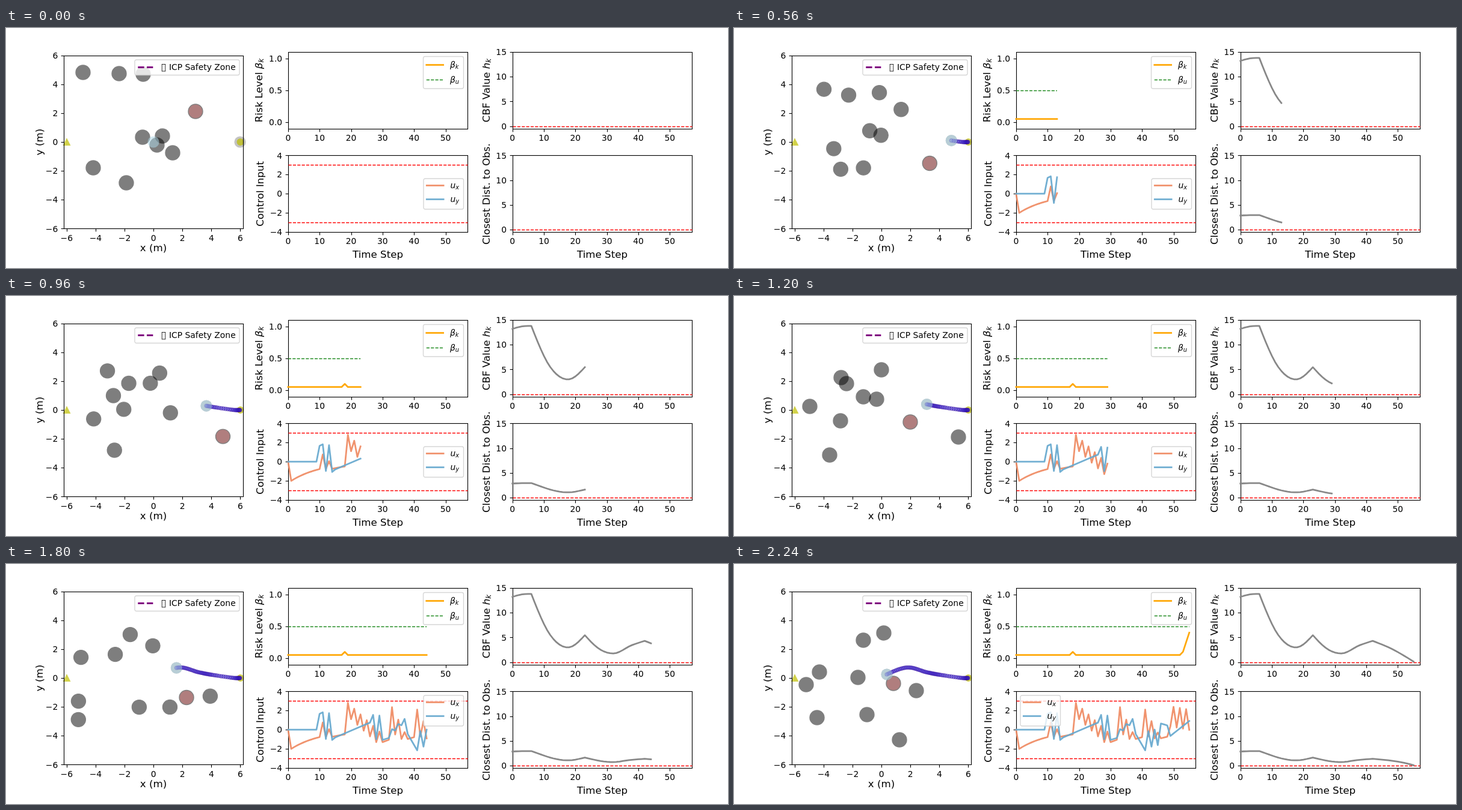
An HTML page for the animation above (2.28 s loop, 1200x400 px).

```html
<!DOCTYPE html>
<html lang="en">
<head>
<meta charset="utf-8">
<title>Safe navigation plots</title>
<style>
  html, body { margin: 0; width: 100%; height: 100%; overflow: hidden; background: #fff; }
  svg { display: block; width: 100vw; height: 100vh; }
  text { font-family: "DejaVu Sans", sans-serif; font-size: 13.89px; fill: #000; }
  .label { font-size: 16.67px; text-anchor: middle; }
  .math { font-style: italic; }
  .frame { fill: none; stroke: #000; stroke-width: 1.11; }
  .curve { fill: none; stroke-width: 2.78; stroke-linejoin: round; stroke-linecap: square; }
  .dashes { stroke: #800080; stroke-dasharray: 10.3 4.44; stroke-linecap: butt; }
  .thin { fill: none; stroke-width: 1.39; stroke-dasharray: 5.14 2.22; }
  .limit { stroke: #f00; }
  .bound { stroke: #228b22; }
  .risk { stroke: #ffa90a; }
  .ux { stroke: #ef8a62; opacity: .92; }
  .uy { stroke: #67a9cf; opacity: .92; }
  .gray { stroke: #888; }
  .box { fill: #fff; fill-opacity: .8; stroke: #ccc; stroke-opacity: .8; stroke-width: 1.39; }
  .mark { fill: #bfbf00; stroke: #bfbf00; stroke-width: 1.2; opacity: .7; }
  .obstacle { fill: #000; stroke: #000; stroke-width: 1.39; opacity: .5; }
  .obstacle.near { fill: #640000; }
  .dot { fill: rgba(50, 30, 210, .4); stroke: rgba(50, 10, 160, .5); stroke-width: 1.2; }
</style>
</head>
<body>
<svg id="stage" viewBox="0 0 1200 400"></svg>
<script>
const STEP_MS = 40, STEPS = 57;
const stage = document.getElementById("stage");
const steps = Array.from({ length: STEPS - 1 }, (_, i) => i);

function set(node, attrs) {
  for (const key in attrs) node.setAttribute(key, attrs[key]);
}
function add(parent, tag, attrs = {}, text = "") {
  const node = document.createElementNS("http://www.w3.org/2000/svg", tag);
  set(node, attrs);
  node.textContent = text;
  parent.appendChild(node);
  return node;
}
function line(parent, x1, y1, x2, y2, cls) {
  return add(parent, "line", { x1, y1, x2, y2, class: cls });
}
function math(node, [base, sub], size) {
  add(node, "tspan", { class: "math" }, base);
  add(node, "tspan", { class: "math", dy: size * 0.16, "font-size": size * 0.7 }, sub);
}
function label(x, y, words, turned, symbol) {
  const attrs = { class: "label", x, y };
  if (turned) attrs.transform = `rotate(-90 ${x} ${y})`;
  const node = add(stage, "text", attrs);
  add(node, "tspan", {}, words);
  if (symbol) math(node, symbol, 16.67);
}
const show = (v, digits) => v.toFixed(digits).replace("-", "\u2212");
const snap = v => Math.floor(v + 0.5) + 0.5;
const range = (from, to, by) =>
  Array.from({ length: Math.round((to - from) / by) + 1 }, (_, i) => from + i * by);

// Axes with ticks; returns the data-to-pixel mapping
const WIDTH = 298.29, HEIGHT = 127.66;
function axes({ x, y, h = HEIGHT, xlim = [0, 57], ylim, xticks = range(0, 50, 10), yticks, digits = 0, limits = [] }) {
  const px = v => x + (v - xlim[0]) / (xlim[1] - xlim[0]) * WIDTH;
  const py = v => y + (ylim[1] - v) / (ylim[1] - ylim[0]) * h;
  const left = snap(x), right = snap(x + WIDTH), top = snap(y), bottom = snap(y + h);
  add(stage, "rect", { class: "frame", x: left, y: top, width: right - left, height: bottom - top });
  for (const v of xticks) {
    line(stage, snap(px(v)), bottom, snap(px(v)), bottom + 4.86, "frame");
    add(stage, "text", { x: px(v), y: y + h + 20.3, "text-anchor": "middle" }, show(v, 0));
  }
  for (const v of yticks) {
    line(stage, left - 4.86, snap(py(v)), left, snap(py(v)), "frame");
    add(stage, "text", { x: x - 9.7, y: py(v) + 5.2, "text-anchor": "end" }, show(v, digits));
  }
  for (const v of limits) line(stage, left, snap(py(v)), right, snap(py(v)), "thin limit");
  return { px, py };
}

const world = add(stage, "g");
const even = range(-6, 6, 2), fives = range(0, 15, 5);
const COL = [96, 468.86, 841.71], ROW = [40, 212.34];
axes({ x: COL[0], y: 45.67, h: 288.67, xlim: [-6.2, 6.2], ylim: [-6, 6], xticks: even, yticks: even });
const risk = axes({ x: COL[1], y: ROW[0], ylim: [-0.1, 1.1], yticks: [0, 0.5, 1], digits: 1 });
const input = axes({ x: COL[1], y: ROW[1], ylim: [-4, 4], yticks: range(-4, 4, 2), limits: [-3, 3] });
const cbf = axes({ x: COL[2], y: ROW[0], ylim: [-0.5, 15], yticks: fives, limits: [0] });
const dist = axes({ x: COL[2], y: ROW[1], ylim: [-0.5, 15], yticks: fives, limits: [0] });

label(245, 371.7, "x (m)");
label(61.2, 190, "y (m)", true);
label(618, 383, "Time Step");
label(991, 383, "Time Step");
label(425.8, 104, "Risk Level ", true, "βk");
label(428.2, 276.3, "Control Input", true);
label(803.8, 104, "CBF Value ", true, "hk");
label(803.8, 276.6, "Closest Dist. to Obs.", true);

// Smooth curve through [t, v] points; "rest" makes it start slowly
function spline(points, rest) {
  const n = points.length - 1;
  const gap = i => points[i + 1][0] - points[i][0];
  const slope = i => (points[i + 1][1] - points[i][1]) / gap(i);
  const m = points.map((_, i) => i && i < n
    ? (gap(i) * slope(i - 1) + gap(i - 1) * slope(i)) / (gap(i) + gap(i - 1)) : 0);
  m[0] = rest ? slope(0) / 2 : 1.5 * slope(0) - m[1] / 2;
  m[n] = 1.5 * slope(n - 1) - m[n - 1] / 2;
  return s => {
    let i = 0;
    while (i < n - 1 && s > points[i + 1][0]) i++;
    const d = gap(i), u = (s - points[i][0]) / d, w = 1 - u;
    return points[i][1] * w * w * (1 + 2 * u) + points[i + 1][1] * u * u * (3 - 2 * u)
      + d * u * w * (m[i] * w - m[i + 1] * u);
  };
}

// Control signal: fades toward zero, except in bursts that alternate around a sloping line
function control(bursts) {
  let u = 0;
  return steps.map(s => {
    const b = bursts.find(b => s >= b.from && s <= b.to);
    if (!b) return u *= 0.9;
    const { mid, fall = 0, swing = 0, floor = -3 } = b, age = s - b.from;
    return u = Math.max(floor, mid - fall * age + (age % 2 ? -swing : swing));
  });
}
const ux = control([
  { from: 1, to: 1, mid: -2 },
  { from: 11, to: 14, mid: .05, fall: .35, swing: .7, floor: -.75 },
  { from: 19, to: 30, mid: 2.1, fall: .3, swing: .7, floor: -1.3 },
  { from: 33, to: 38, mid: 1.25, fall: .65, swing: 1.1, floor: -.97 },
  { from: 41, to: 46, mid: 1, fall: .6, swing: 1.1, floor: -.9 },
  { from: 49, to: 55, mid: 1.4, fall: .06, swing: -1.05 }
]);
const uy = control([
  { from: 10, to: 10, mid: 1.65 },
  { from: 11, to: 14, mid: .45, fall: .05, swing: 1.37 },
  { from: 15, to: 26, mid: -.8, fall: -.14 },
  { from: 27, to: 30, mid: .3, fall: .04, swing: 1.25 },
  { from: 33, to: 37, mid: -.15, fall: -.27, swing: .2 },
  { from: 38, to: 41, mid: -.45, fall: .57 },
  { from: 42, to: 45, mid: -1, fall: -.08, swing: .85 },
  { from: 46, to: 48, mid: .65, fall: .1 },
  { from: 49, to: 55, mid: -.65, fall: -.26 }
]);

// Safety value: smooth arcs that meet at kinks where the nearest obstacle changes
const arcs = [
  [[0, 13.2], [3, 13.7], [6, 13.8]],
  [[6, 13.8], [12, 5.5], [18, 3], [23, 5.45]],
  [[23, 5.45], [28, 2.5], [32, 1.75], [38, 3.45], [42, 4.3]],
  [[42, 4.3], [48, 2.7], [55, .1]]
].map(points => ({ end: points[points.length - 1][0], at: spline(points) }));
const safety = steps.map(s => arcs.find(a => s <= a.end).at(s));
const clearance = safety.map(v => Math.sqrt(v + 0.81) - 0.9);
const beta = steps.map(s => Math.max(.05, s === 18 ? .1 : 0, .4 - .15 * (55 - s)));

const curves = [
  [risk, beta, "curve risk"],
  [risk, steps.map(() => .5), "thin bound"],
  [input, ux, "curve ux"],
  [input, uy, "curve uy"],
  [cbf, safety, "curve gray"],
  [dist, clearance, "curve gray"]
].map(([ax, data, cls]) => {
  const fit = cls.startsWith("thin") ? snap : v => v;
  return {
    node: add(stage, "polyline", { class: cls }),
    points: data.map((v, i) => ax.px(i).toFixed(2) + "," + fit(ax.py(v)).toFixed(2))
  };
});

// Legends: rows of [y, line class, symbol]
function legend(x, y, width, height, rows) {
  const g = add(stage, "g", { transform: `translate(${x} ${y})` });
  add(g, "rect", { class: "box", width, height, rx: 2.8 });
  for (const [at, cls, symbol] of rows) {
    line(g, 5.3, at, 33.1, at, cls);
    if (symbol) math(add(g, "text", { x: 44.5, y: at + 4.6 }), symbol, 13.89);
  }
  return g;
}
const zone = legend(214, 53, 174, 25.5, [[12.5, "curve dashes"]]);
add(zone, "rect", { x: 45.2, y: 7.4, width: 5.6, height: 11.6, fill: "none", stroke: "#000", "stroke-width": .8 });
add(zone, "text", { x: 57, y: 17 }, "ICP Safety Zone");
legend(693.5, 47.5, 67, 53.5, [[14, "curve risk", "βk"], [39, "thin bound", "βu"]]);
const inputKey = legend(694, 251, 66.5, 51, [[11.5, "curve ux", "ux"], [34.5, "curve uy", "uy"]]);

// Routes on the map, in pixels
function route(times, points) {
  const [x, y] = [0, 1].map(axis => spline(points.map((p, i) => [times[i], p[axis]]), true));
  return s => [x(s), y(s)];
}
const walks = [
  [[128, 74], [159, 114], [178, 136], [179, 146], [206, 189]],
  [[188, 76], [195, 129], [215, 168], [221, 233], [221, 251]],
  [[228, 77], [244, 125], [237, 172], [270, 229], [275, 293]],
  [[315, 139], [264, 133], [245, 123], [208, 117], [215, 127]],
  [[227, 182], [256, 183], [293, 210], [303, 224], [265, 199]],
  [[260, 180], [210, 175], [177, 208], [124, 230], [120, 201]],
  [[251, 195], [198, 247], [159, 265], [121, 260], [138, 256]],
  [[277, 208], [344, 231], [373, 235], [345, 222], [303, 211]],
  [[145, 233], [174, 185], [187, 146], [240, 139], [249, 115]],
  [[200, 258], [164, 222], [126, 184], [123, 155], [142, 180]]
].map(points => route([0, 18, 29, 42, 55], points));
const drive = route([0, 7, 18, 29, 42, 55],
  [[389, 190], [380, 190], [344.5, 185], [320.5, 180.5], [288.5, 172.5], [254, 184]]);

const obstacles = walks.map(() => add(world, "circle", { r: 12 }));
const shadow = add(world, "circle", { r: 9.6, fill: "#808080", opacity: .47 });
add(world, "path", { class: "mark", d: "M101 184.5L106.5 195.5H95.5Z" });
add(world, "circle", { class: "mark", cx: 389.5, cy: 190, r: 5.4 });
const dots = steps.map(s => {
  const [cx, cy] = drive(s);
  return add(world, "circle", { class: "dot", cx, cy, r: 3 });
});
const robot = add(world, "circle", { r: 9.6, fill: "#add8e6", opacity: .53 });

function draw(k) {
  const s = Math.max(0, k - 1);
  const [rx, ry] = drive(s);
  const spots = walks.map(walk => walk(s));
  const reach = spots.map(([x, y]) => Math.hypot(x - rx, y - ry));
  const near = reach.indexOf(Math.min(...reach));
  spots.forEach(([cx, cy], i) =>
    set(obstacles[i], { cx, cy, class: i === near ? "obstacle near" : "obstacle" }));
  set(shadow, { cx: rx, cy: ry });
  // The robot disc waits at the centre until the run begins
  set(robot, k ? { cx: rx, cy: ry } : { cx: 245, cy: 190 });
  dots.forEach((dot, i) => set(dot, { visibility: i < k ? "visible" : "hidden" }));
  for (const c of curves)
    set(c.node, { points: k > 1 ? c.points.slice(0, k).join(" ") : "" });
  // The legend moves to where it hides least of the curves
  const spot = k < 45 ? "694 251" : k < 51 ? "694 219" : "476 219";
  set(inputKey, { transform: `translate(${spot})` });
}

let last = -1;
function tick(now) {
  const k = Math.floor(now / STEP_MS) % STEPS;
  if (k !== last) draw(last = k);
  requestAnimationFrame(tick);
}
draw(0);
requestAnimationFrame(tick);
</script>
</body>
</html>
```
